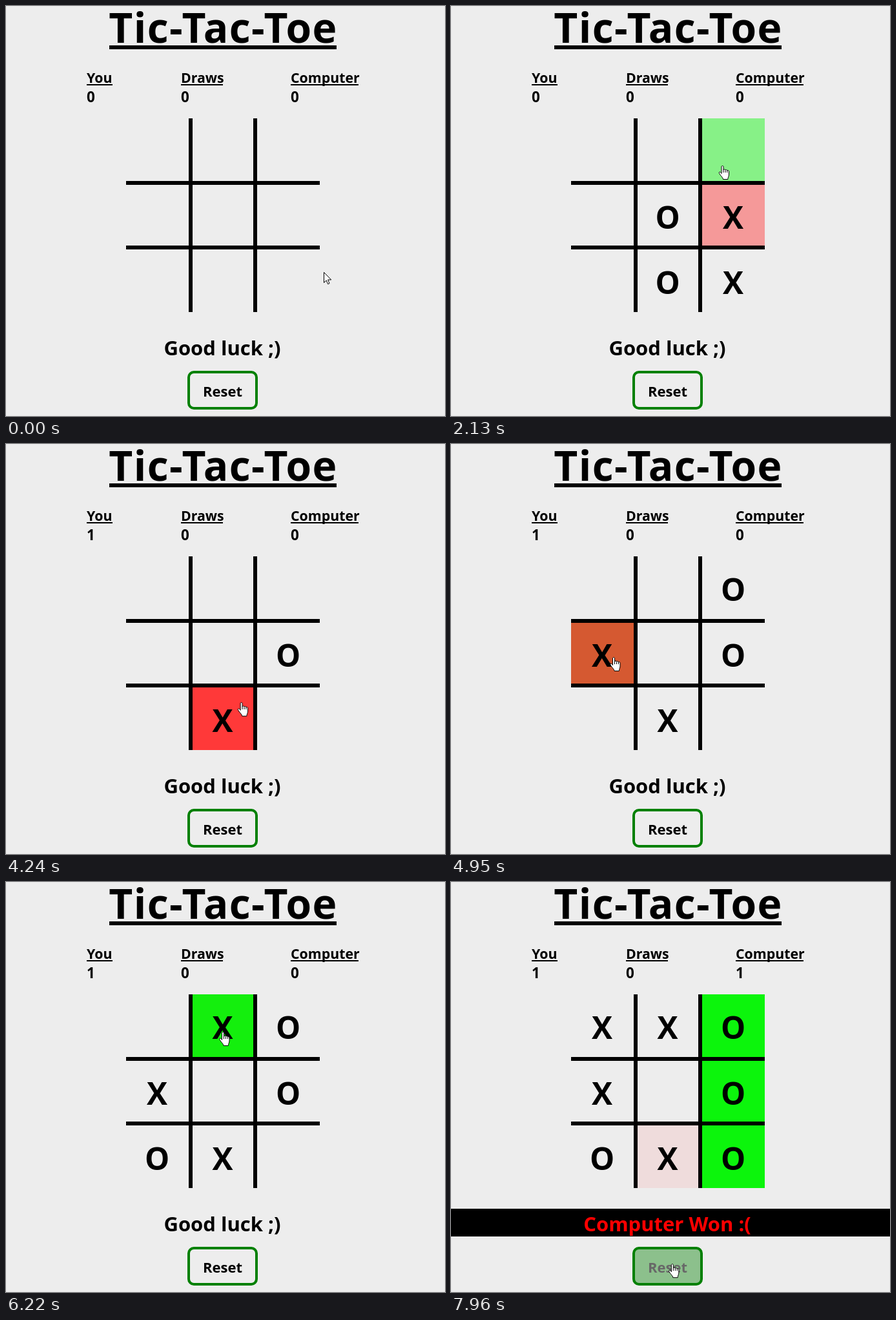
Write an HTML page that moves like this. It is 680 px wide and 635 px high and loops after 8 s.

```html
<!DOCTYPE html>
<html lang="en">
<head>
<meta charset="utf-8">
<title>Tic-Tac-Toe</title>
<style>
html, body { margin: 0; width: 100%; height: 100%; overflow: hidden; background: #ededed; }
svg { display: block; width: 100%; height: 100%; }
text { font-family: "Open Sans", "Noto Sans", sans-serif; font-weight: 700; }
.mid { text-anchor: middle; }
.title { font-size: 64px; letter-spacing: 1.4px; }
.label { font-size: 21.3px; }
.score { font-size: 22.4px; }
.mark { font-size: 48px; }
.message { font-size: 31px; }
.reset { font-size: 22px; }
</style>
</head>
<body>
<svg id="stage" viewBox="0 0 680 635"></svg>
<script>
const LOOP = 8000, FADE = 200, STEP = 91, LAG = 10;
const NONE = [237, 237, 237], GREEN = [12, 245, 12], RED = [255, 57, 57];
const BLACK = [0, 0, 0], WHITE = [255, 255, 255], PRESSED = [0, 128, 0];

// The picture refreshes in equal steps between these moments.
const BEATS = [280, 780, 2130, 3500, 4240, 5580, 6930, 7960, LOOP];

// Pointer: first place, then moves as leave, arrive, x, y
const HOME = [492, 412];
const MOVES = [
  [270, 490, 452, 413], [1050, 1320, 430, 320], [1987, 2130, 420.5, 247],
  [2760, 3000, 340, 590], [3450, 3510, 462, 378], [3520, 3690, 368, 402],
  [4200, 4590, 252, 330], [4960, 5400, 455, 355], [5560, 5580, 461.5, 390],
  [5610, 5950, 336, 232], [6651, 6930, 257.5, 215], [7600, 7970, 343, 592]
];

// Clicks: time and the computer's reply, cells counted row by row
const CLICKS = [[770, 7], [1580, 4], [2480], [3300], [3770, 5], [4760, 2], [6200, 6], [7200, 8]];
const LINES = "012 345 678 036 147 258 048 246".split(" ").map(s => [...s].map(Number));

const BUTTON = 9;
const EDGE = [0, 103, 203], SIZE = [97, 94, 97];
const BOXES = [...Array(9).keys()].map(i => {
  const c = i % 3, r = Math.floor(i / 3);
  return [186 + EDGE[c], 174 + EDGE[r], SIZE[c], SIZE[r]];
});
BOXES.push([281, 565, 109, 60]);

const stage = document.getElementById("stage");

function add(tag, attrs, parent = stage) {
  const el = document.createElementNS("http://www.w3.org/2000/svg", tag);
  for (const key in attrs) el.setAttribute(key, attrs[key]);
  return parent.appendChild(el);
}
function rect(x, y, width, height) {
  return add("rect", { x, y, width, height });
}
function text(cls, x, y, str = "") {
  const el = add("text", { class: cls, x, y });
  el.textContent = str;
  return el;
}
const show = (el, on) => el.setAttribute("visibility", on ? "visible" : "hidden");

// Heading and scores
text("title mid", 336.5, 57, "Tic-Tac-Toe");
rect(160, 61, 352, 6);
const scores = [["You", 125, 40], ["Draws", 271, 65], ["Computer", 441, 105]]
  .map(([name, x, width]) => {
    text("label", x, 119, name);
    rect(x, 121, width, 2);
    return text("score", x, 149, "0");
  });

// Board
const cells = BOXES.slice(0, 9).map(box => rect(...box));
const marks = cells.map((_, i) =>
  text("mark mid", 234 + 101.5 * (i % 3), 243 + 101.5 * Math.floor(i / 3)));
for (const d of [97, 197]) {
  rect(186 + d, 174, 6, 300);
  rect(186, 174 + d, 300, 6);
}

// Message and button
const band = rect(0, 506, 680, 43);
const message = text("message mid", 335, 541);
const button = add("rect", { x: 283, y: 567, width: 105, height: 56, rx: 8,
  stroke: "#008000", "stroke-width": 4 });
const reset = text("reset mid", 335.5, 605, "Reset");

// Pointers
const ink = { fill: "#fff", stroke: "#000", "stroke-linejoin": "round" };
const arrow = add("path", { ...ink,
  d: "M.5 .5V16.5L4.2 13 6.6 18.7 9 17.6 6.6 12H11.7Z" });
const hand = add("g", ink);
add("path", { d: "M-1.5 12.5V2C-1.5 0 1.5 0 1.5 2V7C1.7 5.6 4.3 5.6 4.5 7.2" +
  "C4.7 6.2 7.2 6.2 7.4 8C7.7 7.2 10 7.4 10 9.2V14C10 17 8.3 18.5 8.3 21.5H1" +
  "C1 19-1.5 17.5-3.7 14.2C-5.2 12-5.8 11-4.8 10.2C-3.6 9.4-2.4 11-1.5 12.5Z" }, hand);
add("path", { d: "M1.5 7V11M4.5 7.5V11M7.4 8V11" }, hand);

const clamp = p => Math.min(1, Math.max(0, p));
const smooth = p => p * p * (3 - 2 * p);
const mix = (a, b, p) => a.map((v, i) => v + (b[i] - v) * p);
const rgb = c => `rgb(${c.map(Math.round)})`;

// The curve of the CSS "ease" keyword
function ease(p) {
  if (p <= 0 || p >= 1) return clamp(p);
  let lo = 0, hi = 1, u = 0.5;
  for (let i = 0; i < 24; i++) {
    u = (lo + hi) / 2;
    if (0.75 * u * (1 - u) + u ** 3 < p) lo = u; else hi = u;
  }
  return 0.3 * u * (1 - u) ** 2 + 3 * u * u * (1 - u) + u ** 3;
}

function snap(t) {
  const i = BEATS.findIndex(beat => beat > t);
  if (i === 0) return 0;
  const from = BEATS[i - 1], gap = BEATS[i] - from;
  const step = gap / Math.max(1, Math.round(gap / STEP));
  return from + Math.floor((t - from) / step) * step;
}

function pointer(t) {
  return MOVES.reduce((spot, [leave, arrive, ...goal]) =>
    mix(spot, goal, smooth(clamp((t - leave) / (arrive - leave)))), HOME);
}

// Index of the cell or button under the pointer, or -1
function hit(t) {
  const [px, py] = pointer(t);
  return BOXES.findIndex(([x, y, w, h]) => px >= x && px < x + w && py >= y && py < y + h);
}

const turns = CLICKS.map(([at, reply]) => ({ at, reply, spot: hit(at) }));

// Replays the clicks up to time t
function game(t) {
  const wins = { X: 0, O: 0 };
  let signs = Array(9).fill(""), line = null;
  for (const { at, reply, spot } of turns) {
    if (at > t) break;
    if (spot === BUTTON) {
      signs = Array(9).fill("");
      line = null;
      continue;
    }
    signs[spot] = "X";
    if (reply !== undefined) signs[reply] = "O";
    line = LINES.find(([a, b, c]) => signs[a] && signs[a] === signs[b] && signs[a] === signs[c]);
    if (line) wins[signs[line[0]]]++;
  }
  return { signs, wins, line };
}

// Colours aimed for at time t: nine cells, button, button text
function goals(t) {
  const { signs, line } = game(t), over = hit(t);
  const list = signs.map((sign, i) => {
    if (line && line.includes(i)) return GREEN;
    return i !== over ? NONE : sign ? RED : GREEN;
  });
  return over === BUTTON ? [...list, PRESSED, WHITE] : [...list, NONE, BLACK];
}

const rest = goals(0), fades = rest.map(() => []);
for (let t = 0, last = rest; t < LOOP; t += 2) {
  const next = goals(t);
  next.forEach((goal, i) => { if (goal !== last[i]) fades[i].push([t, goal]); });
  last = next;
}
const colour = (i, t) => rgb(fades[i].reduce((c, [at, goal]) =>
  mix(c, goal, ease((t - at) / FADE)), rest[i]));

function draw(t) {
  const { signs, wins, line } = game(t);
  [...cells, button, reset].forEach((el, i) => el.setAttribute("fill", colour(i, t)));
  marks.forEach((mark, i) => mark.textContent = signs[i]);
  scores[0].textContent = wins.X;
  scores[2].textContent = wins.O;

  const winner = line ? signs[line[0]] : "";
  const [words, tint] = {
    "": ["Good luck ;)", "#000"],
    X: ["You Won :)", "#0f0"],
    O: ["Computer Won :(", "#f00"]
  }[winner];
  show(band, winner);
  message.textContent = words;
  message.setAttribute("fill", tint);

  const place = `translate(${pointer(t)})`, over = hit(t - LAG) >= 0;
  for (const el of [arrow, hand]) el.setAttribute("transform", place);
  show(arrow, !over);
  show(hand, over);
}

const start = performance.now();
function frame() {
  draw(snap((performance.now() - start) % LOOP));
  requestAnimationFrame(frame);
}
frame();
</script>
</body>
</html>
```
